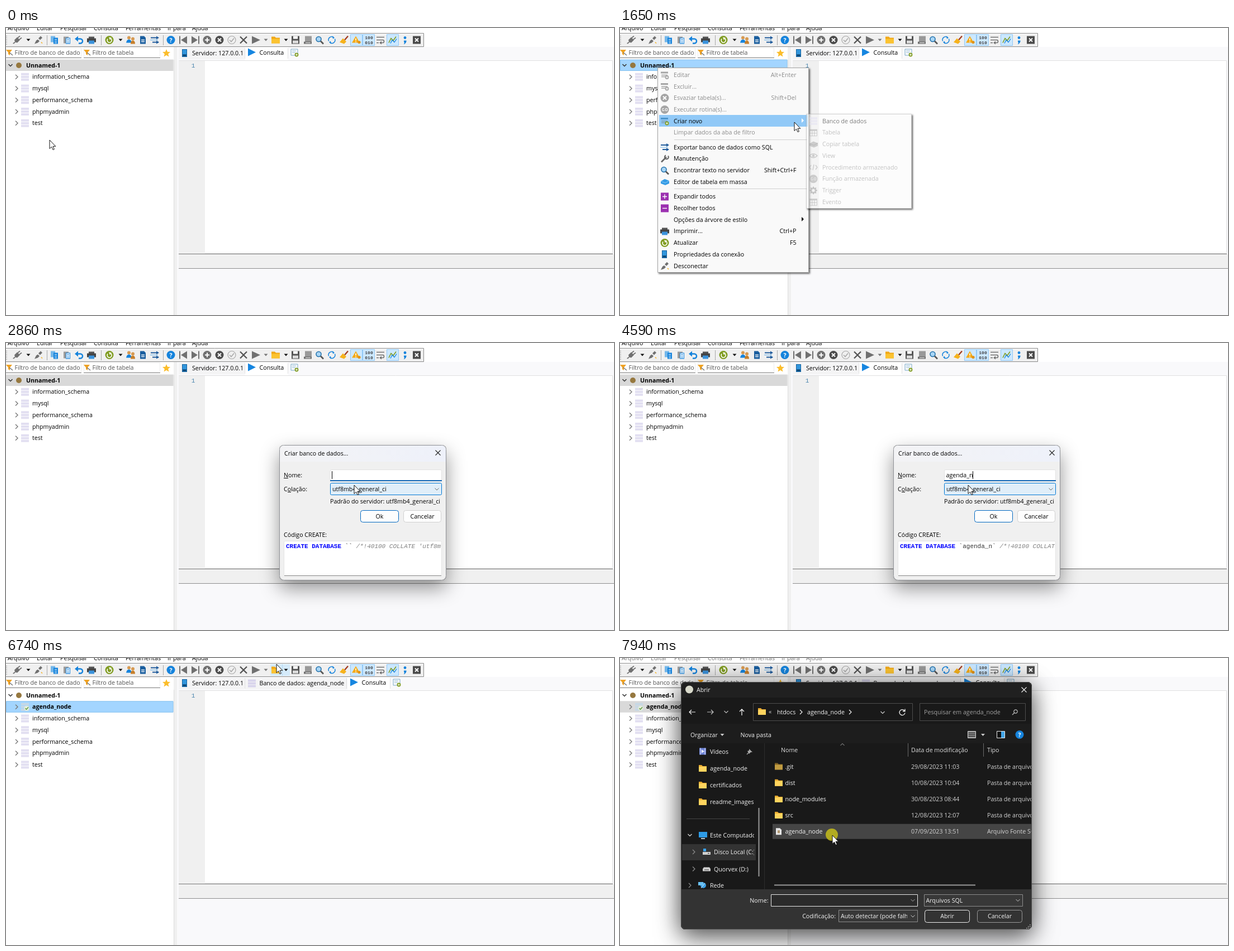
Recreate the animation shown at these times as an HTML page with a canvas. Size 1088x515 px, loop 8 s.

```html
<!DOCTYPE html>
<html lang="pt">
<head>
<meta charset="utf-8">
<title>Criar banco de dados</title>
<style>
html, body { margin: 0; width: 100%; height: 100%; overflow: hidden; background: #fff; }
canvas { display: block; width: 1088px; height: 515px; }
</style>
</head>
<body>
<canvas id="stage" width="1088" height="515"></canvas>
<script>
const g = document.getElementById('stage').getContext('2d');
const LOOP = 8000;
const SANS = '"Open Sans", "Noto Sans", sans-serif', MONO = '"Liberation Mono", monospace';
const GREY = '#707070', BLUE = '#1583dc', GOLD = '#f6b21b', GREEN = '#809c22', LAV = '#e2dff1';

// Basic drawing
function box(x, y, w, h, fill, line, r = 0) {
  g.beginPath();
  if (line) g.roundRect(x + .5, y + .5, w - 1, h - 1, r); else g.roundRect(x, y, w, h, r);
  if (fill) { g.fillStyle = fill; g.fill(); }
  if (line) { g.strokeStyle = line; g.lineWidth = 1; g.stroke(); }
}
function shape(x, y, d, color, width) {
  g.save();
  g.translate(x, y);
  const p = new Path2D(d);
  if (width) { g.strokeStyle = color; g.lineWidth = width; g.stroke(p); }
  else { g.fillStyle = color; g.fill(p); }
  g.restore();
}
function text(s, x, y, color = '#000', { bold, align = 'left', font } = {}) {
  g.font = font || `${bold ? 'bold ' : ''}10.65px ${SANS}`;
  g.textAlign = align;
  g.fillStyle = color;
  g.fillText(s, x, y + 4);
}
function clipped(x, y, w, h, draw) {
  g.save();
  g.beginPath();
  g.rect(x, y, w, h);
  g.clip();
  draw();
  g.restore();
}
// Only the part outside the box, so that faded boxes stay clean
function shadow(x, y, w, h, r, blur, shift, color) {
  g.save();
  g.beginPath();
  g.rect(-200, -200, 1500, 1000);
  g.roundRect(x, y, w, h, r);
  g.clip('evenodd');
  g.shadowColor = color;
  g.shadowBlur = blur;
  [g.shadowOffsetX, g.shadowOffsetY] = shift;
  box(x, y, w, h, '#000', null, r);
  g.restore();
}
function zoomed(cx, cy, s, alpha, draw) {
  g.save();
  g.globalAlpha = alpha;
  g.translate(cx, cy);
  g.scale(s, s);
  g.translate(-cx, -cy);
  draw();
  g.restore();
}
const ring = (r, x = 0, y = 0) => `M${x - r} ${y}a${r} ${r} 0 1 0 ${2 * r} 0a${r} ${r} 0 1 0 ${-2 * r} 0Z`;
const bar = (x, y, w, h) => `M${x} ${y}h${w}v${h}h${-w}Z`;
const CHEVRON = { down: 'M-3.5 -2L0 1.5L3.5 -2', up: 'M-3.5 2L0 -1.5L3.5 2', right: 'M-2 -4L2 0L-2 4' };
const chevron = (dir, x, y, color, w = 1.2) => shape(x, y, CHEVRON[dir], color, w);
const caretDown = (x, y, c = '#222') => shape(x, y, 'M-3.5 -2H3.5L0 2Z', c);

// Icon layers: path, colour, optional stroke width
const icons = {
  plug: [['M-8 6L-4 3L-5 0L0 -5L5 0L0 5L-3 4L-6 7Z', GREY], ['M1 -4L5 -7M4 -1L8 -4', GREY, 1.6]],
  unplug: [['M-7 7L-4 1L-1 -1L2 2L-1 5Z', GREY], ['M0 -3L4 -7L7 -4L3 0Z', GREY], ['M5 4L7 6', GOLD, 1.5]],
  copy: [[bar(-7, -7, 8, 11), '#74b7ea'], [bar(-2, -4, 8, 11), BLUE], ['M0 -1H4M0 2H4M0 5H4', '#fff', 1]],
  paste: [[bar(-6, -6, 9, 12), '#9b9b9b'], [bar(-2, -4, 8, 11), BLUE], [bar(-1, -3, 6, 9), '#fff'], ['M0 -1H4M0 2H4M0 5H4', BLUE, 1]],
  undo: [['M-5 -2H2a4 4 0 0 1 0 8H-1', BLUE, 2.5], ['M-8 -2L-2 -7V3Z', BLUE]],
  print: [[bar(-5, -6, 10, 4), '#555'], [bar(-8, -3, 16, 7), '#444'], [bar(-5, 1, 10, 6), '#3b93dc']],
  refresh: [[ring(7.5), GREEN], ['M-3 -2a4 4 0 1 0 5 -1', '#fff', 1.6], ['M-1 -5L4 -4L1 0Z', '#fff']],
  users: [[ring(3, -3, -4) + ring(3, 4, -2), '#d79a52'], ['M-8 5Q-7 -1 -3 -1Q1 -1 2 5Z', BLUE], ['M0 7Q0 1 4 1Q8 1 8 7Z', '#c77f2b']],
  doc: [['M-5 -7H2L5 -4V7H-5Z', '#1a5e9e'], ['M-3 0H3M-3 3H3', '#fff', 1.4]],
  flow: [['M-7 -4H4M-4 4H7', '#215c9c', 2], ['M3 -7L8 -4L3 -1ZM3 1L8 4L3 7Z', '#215c9c'], ['M-8 0H6', '#62aee8', 1]],
  help: [[ring(7.5), BLUE]],
  first: [[bar(-7, -7, 2, 14) + 'M7 -7V7L-4 0Z', GREY]],
  last: [[bar(5, -7, 2, 14) + 'M-7 -7V7L4 0Z', GREY]],
  plus: [[ring(7.5), GREY], ['M-4 0H4M0 -4V4', '#fff', 2]],
  stop: [[ring(7.5), '#4c4c4c'], ['M-3 -3L3 3M3 -3L-3 3', '#fff', 2]],
  check: [[ring(7), '#a9a9a9', 1.2], ['M-4 0L-1 3L4 -3', '#a9a9a9', 1.6]],
  cross: [['M-6 -6L6 6M6 -6L-6 6', '#505050', 2.2]],
  play: [['M-7 -7L8 0L-7 7Z', GREY]],
  run: [['M-7 -7L7 0L-7 7Z', '#1686e0']],
  folder: [['M-8 -6H-2L0 -4H7V6H-8Z', '#f0a818'], [bar(-8, -2, 15, 8), '#fbc331']],
  dir: [['M-7 -6H-2L0 -4H7V6H-7Z', '#e9ab30'], [bar(-7, -3, 14, 9), '#ffd45e']],
  save: [[bar(-7, -7, 14, 14), '#555'], [bar(-4, -7, 8, 5), '#fff'], [bar(-5, 1, 10, 5), '#ddd']],
  saveAs: [[bar(-5, -7, 12, 11), '#999'], [bar(-7, 3, 14, 4), GREY], ['M-4 5H5', '#eee', 1]],
  find: [[ring(4.5, -1.5, -1.5), '#a8d5f5'], [ring(4.5, -1.5, -1.5), '#2472ac', 1.6], ['M2 2L7 7', '#555', 2.6]],
  replace: [['M-5.5 2A5.8 5.8 0 0 1 3 -5M5.5 -2A5.8 5.8 0 0 1 -3 5', BLUE, 1.5], ['M1 -7L5 -4L2 -2ZM-1 7L-5 4L-2 2ZM4 4L7 7', BLUE]],
  broom: [['M7 -7L1 0', '#a33d24', 2.4], ['M-2 -3L4 3L0 7L-8 4Z', GOLD]],
  warn: [['M-1 -7L6 5H-8Z', '#f5aa17'], ['M-1 -3V1M-1 2.5V4', '#fff', 1.6], [ring(2.6, 5, 4), '#e19319']],
  wrap: [['M-7 -5H7M-7 0H5a2.8 2.8 0 0 1 0 5H0M-7 5H-3', GREY, 1.6], ['M-2 5L2 2V8Z', GREY]],
  wand: [['M-7 5L-3 -3L1 1L6 -6', GREEN, 1.6], ['M-4 6L-1 0L3 4L7 -2', BLUE, 1.3]],
  semi: [[ring(2.4, 0, -4), BLUE], ['M-2 1H2.5Q3 5 -2 8L-1 4H-2Z', BLUE]],
  close: [[bar(-7, -7, 14, 14), '#4b4b4b'], ['M-3 -3L3 3M3 -3L-3 3', '#fff', 1.8]],
  db: [[bar(-7, -7, 14, 4) + bar(-7, -2, 14, 4) + bar(-7, 3, 14, 4), LAV]],
  server: [[bar(-5, -7, 9, 14), '#16639f'], [bar(-4, -6, 7, 8), '#3296dc'], ['M-3 4H2', '#0b3556', 1.4]],
  filter: [['M-6 -5H5L1 0V5L-2 3V0Z', '#efa223'], ['M0 0L6 5', '#777', 1.5]],
  star: [['M0 -7L2 -2.3L7 -2L3.2 1.4L4.4 6.5L0 3.7L-4.4 6.5L-3.2 1.4L-7 -2L-2 -2.3Z', '#fbbd2b']],
  newTab: [['M-6 -6H6V5H-6Z', '#7babc9', 1], ['M-4 -3H3M-4 0H2', '#8fbcd8', 1], [ring(3.4, 4, 4), GREEN], ['M2 4H6M4 2V6', '#fff', 1]],
  sheet: [[bar(-7, -6, 13, 3), '#4d95cc'], ['M-6 0H5M-6 3H1', '#7f9aab', 1.4], [ring(3.4, 4, 4), GREEN], ['M2 4H6M4 2V6', '#fff', 1]],
  go: [[ring(7.5), '#777'], ['M-1 -2H-4V2H-1V0M1.5 -2H4.5V2H1.5Z', '#fff', 1]],
  wrench: [['M-6 6L3 -3', '#666', 2.6], ['M6 -5A3.5 3.5 0 1 1 2 -6', '#666', 2]],
  cube: [['M-7 -1L0 -5L8 -2V3L1 6L-7 3Z', '#349be5'], ['M-7 -1L1 2L8 -2', '#89c9f4', 1]],
  expand: [[bar(-7, -7, 14, 14), '#9b30b0'], ['M-4 0H4M0 -4V4', '#fff', 1.4]],
  collapse: [[bar(-7, -7, 14, 14), '#9b30b0'], ['M-4 0H4', '#fff', 1.4]],
  table: [[bar(-7, -6, 14, 3), '#888'], ['M-6.5 -3V6H6.5V-3M-6 1H6M-2 -3V6M2 -3V6', '#999', 1]],
  eye: [['M-7 0Q0 -7 7 0Q0 7 -7 0Z', '#999', 1.4], [ring(2.3), '#888']],
  code: [['M-4 -4L-7 0L-4 4M4 -4L7 0L4 4M1 -5L-1 5', '#888', 1.4]],
  gear: [[ring(4), '#777', 3], ['M0 -7V-4M0 4V7M-7 0H-4M4 0H7M-5 -5L-3 -3M5 5L3 3M5 -5L3 -3M-5 5L-3 3', '#777', 2]],
  film: [[bar(-6, -6, 12, 12), '#6f86d8'], ['M-4 -6V6M4 -6V6', '#e5e0ff', 1], ['M-2 -3L3 0L-2 3Z', '#fff']],
  pin: [['M-1 -5L5 1L2 1L-1 4L-4 -1L-1 -2ZM-2 2L-5 5', '#aaa'], ['M-2 2L-5 5', '#aaa', 1.2]],
  screen: [[bar(-7, -6, 15, 10), '#2e9be6'], [bar(-3, 5, 7, 2), '#b9c9d4']],
  disk: [[bar(-7, 0, 14, 5), '#d0d0d0'], [bar(-6, -6, 5, 5), '#39a2ec'], ['M2 2.5H5', '#333', 1]],
  drive: [['M-5 -3H5L7 0V4H-7V0Z', '#d0d0d0'], ['M-4 1.5H4', '#444', 1]],
  net: [[ring(5, 1, 0), '#3b9fe4'], [bar(-8, -6, 9, 6), '#69c0f2'], ['M-3 5L4 -4', '#d9f1ff', 1]],
  file: [['M-5 -6H2L5 -3V6H-5Z', '#e8e8e8'], [bar(-2, -2, 4, 5), '#b39a74']],
};
function icon(name, x, y, tint) {
  for (const [d, c, w] of icons[name]) shape(x, y, d, tint && c !== '#fff' ? tint : c, w);
}
const helpMark = (x, y) => {
  icon('help', x, y);
  text('?', x, y + .5, '#fff', { bold: true, align: 'center' });
};

// Timing
const clamp = v => Math.max(0, Math.min(1, v));
const span = (t, a, b) => clamp((t - a) / (b - a));
const within = (t, a, b) => t >= a && t < b;
const easeOut = u => 1 - (1 - u) ** 3;
const route = [
  [130, 78, 201], [590, 67, 71], [880, 67, 71], [1230, 150, 160], [1520, 289, 167], [1650, 312, 169],
  [1930, 400, 168], [2180, 376, 173], [2420, 376, 173], [2860, 623, 255], [5230, 623, 255], [5670, 376, 193],
  [5740, 376, 193], [5860, 240, 112], [6050, 166, 86], [6320, 166, 86], [6680, 484, 11], [6860, 484, 11],
  [7320, 505, 143], [7500, 505, 143], [7850, 380, 318],
];
function pointer(t) {
  const i = route.findIndex(k => k[0] > t);
  if (i === 0) return route[0].slice(1);
  if (i < 0) return route[route.length - 1].slice(1);
  const [t0, x0, y0] = route[i - 1], [t1, x1, y1] = route[i];
  let u = (t - t0) / (t1 - t0);
  u = u * u * (3 - 2 * u);
  return [x0 + (x1 - x0) * u, y0 + (y1 - y0) * u];
}
const NAME = 'agenda_node';
const keys = [3120, 3320, 3420, 3520, 3650, 3790, 4320, 4590, 4680, 4770, 4850];
const typed = t => NAME.slice(0, keys.filter(k => t >= k).length);

// Main window
const tools = { plug: 20, unplug: 58, copy: 87, paste: 109, undo: 131, print: 153, refresh: 185, users: 223, doc: 245,
  flow: 266, first: 317, last: 339, plus: 360, stop: 382, check: 404, cross: 425, play: 447, folder: 483, save: 518,
  saveAs: 540, find: 561, replace: 583, broom: 605, warn: 627, wrap: 670, wand: 692, semi: 714, close: 735 };
const menuBar = { Arquivo: 3, Editar: 55, Pesquisar: 97, Consulta: 157, Ferramentas: 214, 'Ir para': 289, Ajuda: 333 };

function toolbar(t) {
  for (const s in menuBar) text(s, menuBar[s], 0, t > 7200 ? '#777' : '#000');
  box(-1, 9, 749, 25, '#f0f0f0', '#8a8a8a');
  box(0, 10, 747, 1, '#fff');
  for (let y = 14; y < 30; y += 3) box(0, y, 2, 1, '#aaa');
  for (const x of [73, 170, 281]) box(x, 13, 1, 18, '#a8a8a8');
  for (const x of [627, 649, 692]) box(x - 11, 11, 22, 21, '#cce8ff', '#90c8f6');
  if (within(t, 6640, 7000)) {
    box(473, 11, 35, 21, '#d5ebfb');
    box(494, 11, 1, 21, '#b5d9f3');
  }
  for (const n in tools) icon(n, tools[n], 21.5);
  helpMark(295, 21.5);
  for (const x of [40, 205, 465, 501]) caretDown(x, 21.5, x === 465 ? '#777' : '#111');
  const tiny = { bold: true, align: 'center', font: `bold 8px ${MONO}` };
  text('100', 649.5, 16, '#444', tiny);
  text('010', 649.5, 25, '#444', tiny);
}

function tree(t) {
  box(0, 34, 300, 481, '#fff');
  for (const [x, w, s] of [[0, 135, 'Filtro de banco de dado'], [139, 137, 'Filtro de tabela']]) {
    box(x, 35, w, 18, '#fff', '#ececec');
    box(x, 53, w, 1, '#868686');
    icon('filter', x + 6, 44);
    text(s, x + 15.5, 44, '#555');
  }
  icon('star', 287, 45);
  const made = t >= 5240, opened = t >= 6120;
  const focused = within(t, 600, 2320) || within(t, 5240, 7180);
  const rowY = i => 66.5 + 20.75 * i;
  box(0, rowY(opened ? 1 : 0) - 10, 299.5, 20.5, focused ? '#a3d5ff' : '#d9d9d9', focused ? '#84c1ef' : null);
  chevron('down', 8, 67, '#333', 1.5);
  shape(23, 67, ring(5), '#96783f');
  text('Unnamed-1', 36, 66.5, '#000', { bold: true });
  const names = ['information_schema', 'mysql', 'performance_schema', 'phpmyadmin', 'test'];
  if (made) names.unshift(NAME);
  names.forEach((s, i) => {
    const y = rowY(i + 1), active = opened && i === 0;
    chevron('right', 19, y + .5, '#777', 1.4);
    icon('db', 34, y + .5, active && '#c6d8e5');
    if (active) {
      shape(37, y + 3, ring(4.5), '#e4eedb');
      shape(37, y + 3, 'M-2.5 0L-.5 2L3 -2', '#5b963a', 1.4);
    }
    text(s, 47, y, '#000', { bold: active });
  });
}

function editor(t) {
  box(300, 34, 788, 481, '#f9f9fb');
  box(300, 34, 6, 481, '#f0f0f0');
  box(300, 57, 1, 458, '#ddd');
  const shift = t >= 6200 ? 183 : 0;
  box(309, 36, 117, 20, '#f4f4f5');
  icon('server', 320, 45);
  text('Servidor: 127.0.0.1', 333, 45);
  box(427, 36, 1, 19, '#dedede');
  if (shift) {
    box(428, 36, 181, 20, '#f4f4f5');
    icon('db', 440, 45.5, '#d8d4ec');
    text('Banco de dados: ' + NAME, 453.5, 45);
    box(609, 36, 1, 19, '#dedede');
  }
  box(428 + shift, 34, 77, 24, '#fff');
  icon('run', 440 + shift, 43.5);
  text('Consulta', 453.5 + shift, 44);
  box(504 + shift, 36, 1, 19, '#e2e2e2');
  icon('newTab', 516 + shift, 44);
  box(309, 58, 777, 347, '#fff', '#e0e0e0');
  box(309, 59, 47, 346, '#f0f0f0');
  text('1', 335, 67, '#4884ad', { align: 'center', font: `11px ${MONO}` });
  box(309, 405, 777, 1, '#767676');
  box(309, 406, 779, 25, '#f0f0f0');
  box(309, 431, 779, 1, '#8d8d8d');
}

// Context menus: centre y, label, icon, enabled, shortcut
const contextItems = [
  [84, 'Editar', 'sheet', 0, 'Alt+Enter'], [104.5, 'Excluir...', 'sheet', 0], [125, 'Esvaziar tabela(s)...', 'stop', 0, 'Shift+Del'],
  [146, 'Executar rotina(s)...', 'go', 0], [166.5, 'Criar novo', 'sheet', 1], [187, 'Limpar dados da aba de filtro', '', 0],
  [213.5, 'Exportar banco de dados como SQL', 'flow', 1], [234, 'Manutenção', 'wrench', 1],
  [255, 'Encontrar texto no servidor', 'find', 1, 'Shift+Ctrl+F'], [275.5, 'Editor de tabela em massa', 'cube', 1],
  [302, 'Expandir todos', 'expand', 1], [323, 'Recolher todos', 'collapse', 1], [343.5, 'Opções da árvore de estilo', '', 1],
  [364, 'Imprimir...', 'print', 1, 'Ctrl+P'], [385, 'Atualizar', 'refresh', 1, 'F5'],
  [405.5, 'Propriedades da conexão', 'server', 1], [426.5, 'Desconectar', 'unplug', 1],
];
const createItems = [['Banco de dados', 'db'], ['Tabela', 'table'], ['Copiar tabela', 'cube'], ['View', 'eye'],
  ['Procedimento armazenado', 'code'], ['Função armazenada', 'go'], ['Trigger', 'gear'], ['Evento', 'table']]
  .map(([s, n], i) => [166.5 + 20.75 * i, s, n, i === 0]);

function menu(x, y, w, h, items, alpha, isHot) {
  g.save();
  g.globalAlpha = clamp(alpha * 2);
  shadow(x, y, w, h, 0, 3, [2, 2], 'rgba(0,0,0,.6)');
  g.globalAlpha = alpha;
  box(x, y, w, h, '#f9f9f9', '#a5a5a5');
  for (const [cy, label, name, on, keys] of items) {
    if (isHot(cy)) box(x + 3, cy - 10.5, w - 5, 21, on ? '#91c9f7' : '#e8e8e8');
    if (name) icon(name, x + 13, cy + .5, !on && '#a5a5a5');
    const c = on ? '#000' : '#8d8d8d';
    text(label, x + 29, cy, c);
    if (keys) text(keys, x + 248.5, cy, c, { align: 'right' });
  }
  g.restore();
}
function menus(t, [px, py]) {
  if (!within(t, 730, 2330)) return;
  const inSub = px > 334 && t > 1700, fade = span(t, 680, 860);
  menu(67, 71, 271, 368, contextItems, fade, cy => inSub ? cy === 166.5 : py > 73 && Math.abs(py - cy) <= 10.4);
  g.globalAlpha = fade;
  for (const y of [200, 288]) box(97, y, 238, 1, '#cfcfcf');
  shape(327, 166, 'M-2 -4L2 0L-2 4Z', t > 1560 ? '#fff' : '#111');
  shape(327, 343, 'M-2 -4L2 0L-2 4Z', '#111');
  g.globalAlpha = 1;
  if (t > 1580) menu(333, 154, 189, 170, createItems, span(t, 1580, 1720), cy => inSub && Math.abs(py - cy) <= 10.4);
}

function createDialog(t, [px, py]) {
  shadow(489, 183, 299, 243, 8, 34, [0, 14], 'rgba(0,0,0,.42)');
  box(489, 183, 299, 243, '#f0f0f0', '#8f9196', 8);
  const tint = g.createLinearGradient(490, 0, 787, 0);
  tint.addColorStop(0, '#f3f3f5');
  tint.addColorStop(1, '#eef1fa');
  g.beginPath();
  g.roundRect(490, 184, 297, 29, [7, 7, 0, 0]);
  g.fillStyle = tint;
  g.fill();
  text('Criar banco de dados...', 498, 197.5);
  shape(773, 197, 'M-4.5 -4.5L4.5 4.5M4.5 -4.5L-4.5 4.5', '#222', 1.1);
  text('Nome:', 497, 237);
  box(497, 242, 8, 1, '#000');
  text('Colação:', 497, 262);
  box(504, 267, 6, 1, '#000');
  box(580, 227, 200, 21, '#fff', '#e1e1e1', 2);
  box(580, 246, 200, 2, '#1467b5');
  const name = typed(t);
  text(name, 583.5, 237);
  box(583 + g.measureText(name).width, 230, 1, 14, '#000');
  const hot = px > 580 && px < 780 && py > 250 && py < 274;
  box(580, 251, 200, 22, hot ? '#e0eef9' : '#fdfdfd', hot ? '#0078d4' : '#d0d0d0', 2);
  text('utf8mb4_general_ci', 584, 262);
  chevron('down', 771, 262.5, '#666', 1);
  text('Padrão do servidor: utf8mb4_general_ci', 580, 284);
  box(634, 300, 69, 22, '#fdfdfd', '#0067c0', 4);
  text('Ok', 668.5, 311, '#000', { align: 'center' });
  box(711, 300, 68, 22, '#fdfdfd', '#d0d0d0', 4);
  text('Cancelar', 745, 311, '#000', { align: 'center' });
  text('Código CREATE:', 497, 344);
  box(497, 355, 283, 63, '#fff', '#e3e3e3', 2);
  box(498, 417, 281, 1, '#868686');
  clipped(498, 355, 280, 60, () => {
    const w = 6.6;
    text('CREATE DATABASE', 501, 363.5, '#00f', { font: `bold 11px ${MONO}` });
    text('`' + name + '`', 501 + 16 * w, 363.5, '#333', { font: `11px ${MONO}` });
    text("/*!40100 COLLATE 'utf8mb4_general_ci' */", 501 + (19 + name.length) * w, 363.5, '#808080', { font: `italic 11px ${MONO}` });
  });
}

// File picker
const files = [['.git', 'dir', '29/08/2023 11:03'], ['dist', 'dir', '10/08/2023 10:04'],
  ['node_modules', 'dir', '30/08/2023 08:44'], ['src', 'dir', '12/08/2023 12:07'], [NAME, 'file', '07/09/2023 13:51']];
const places = [[167.5, 'Vídeos', 'film'], [198, NAME, 'dir'], [228, 'certificados', 'dir'], [258, 'readme_images', 'dir'],
  [318, 'Este Computador', 'screen', 'down'], [348, 'Disco Local (C:)', 'disk', 'right', 7],
  [378.5, 'Quorvex (D:)', 'drive', 'right', 7], [408, 'Rede', 'net', 'right']];

function openDialog(t, [px, py]) {
  const ink = '#f2f2f2', dim = '#a0a0a0', mid = { align: 'center' };
  shadow(109, 43, 628, 444, 8, 40, [0, 2], 'rgba(0,0,0,.35)');
  shadow(109, 43, 628, 444, 8, 44, [0, 16], 'rgba(0,0,0,.5)');
  g.save();
  g.beginPath();
  g.roundRect(109, 43, 628, 444, 8);
  g.clip();
  box(109, 43, 628, 444, '#191919');
  box(109, 43, 628, 28, '#202020');
  box(109, 118, 628, 35, '#1d1d1d');
  shape(124, 56.5, ring(7), '#d9dacb');
  text('Abrir', 137, 57, ink);
  shape(723, 57, 'M-4.5 -4.5L4.5 4.5M4.5 -4.5L-4.5 4.5', ink, 1.1);
  shape(129, 97, 'M6 0H-5M-1 -4L-5 0L-1 4', ink, 1.2);
  shape(162, 97, 'M-6 0H5M1 -4L5 0L1 4', '#c2c2c2', 1.2);
  chevron('down', 190, 97, '#bbb');
  shape(218, 97, 'M0 6V-5M-4 -1L0 -5L4 -1', ink, 1.3);
  box(238, 81, 286, 32, '#191919', '#4d4d4d');
  icon('dir', 254, 96);
  text('«', 266, 95.5, '#ccc');
  text('htdocs', 281, 97, ink);
  chevron('right', 324, 97, ink);
  text(NAME, 335, 97, ink);
  if (t > 7420) chevron('right', 412, 97, ink);
  chevron('down', 470, 98, '#ccc');
  shape(505, 97.5, 'M4 -3A5 5 0 1 0 5 1M5 -6V-2H1', ink, 1.3);
  box(536, 81, 190, 32, '#191919', '#4d4d4d');
  text('Pesquisar em ' + NAME, 544, 97, dim);
  shape(707, 97, ring(3.2, 1, -1) + 'M-1.5 1.5L-5 5', '#bbb', 1.2);
  text('Organizar', 126, 137.5, ink);
  caretDown(183, 138, '#ccc');
  text('Nova pasta', 215.5, 137.5, ink);
  box(622, 131, 15, 13, '#888', '#ccc');
  shape(629.5, 137.5, 'M-6 -3H6M-6 0H6M-6 3H6', '#222', 1);
  caretDown(649.5, 138, '#ccc');
  box(674, 131, 15, 13, '#111', '#eee');
  box(682, 132, 6, 11, '#42a5e8');
  helpMark(715, 137.5);

  clipped(109, 153, 134, 262, () => {
    box(111, 334, 132, 29, '#333');
    for (const [y, s, name, dir, indent = 0] of places) {
      icon(name, 148 + indent, y);
      if (dir) chevron(dir, 125 + indent, y, dir === 'down' ? '#ddd' : '#8c8c8c');
      clipped(109, y - 12, 131, 24, () => text(s, 161 + indent, y, ink));
    }
    icon('pin', 232, 168);
    box(119, 288, 113, 1, '#444');
  });
  box(247.5, 269, 2, 123, '#999');
  box(258, 153, 1, 262, '#2d2d2d');

  text('Nome', 288, 164.5, '#ddd');
  chevron('up', 398, 155, '#aaa', 1);
  text('Data de modificação', 521, 164.5, '#ddd');
  text('Tipo', 657, 164.5, '#ddd');
  for (const x of [515, 650]) box(x, 153, 1, 24, '#6b6b6b');
  files.forEach(([s, name, date], i) => {
    const y = 194.5 + 29.2 * i;
    if (t > 7550 && px > 273 && Math.abs(py - y) < 13.5) box(273, y - 13.5, 464, 27, '#454545');
    g.save();
    if (i === 0) g.globalAlpha *= .5;
    icon(name, 284, y);
    g.restore();
    text(s, 295.5, y, ink);
    text(date, 521, y, '#d2d2d2');
    text(name === 'file' ? 'Arquivo Fonte SQL' : 'Pasta de arquivos', 657, y, '#d2d2d2');
  });
  box(276, 406.5, 360, 2, '#999');

  box(109, 415, 628, 72, '#333');
  const right = { align: 'right' };
  text('Nome:', 265.5, 434.5, ink, right);
  box(270, 424, 263, 22, '#2b2b2b', '#e8e8e8');
  if (t < 7800) box(274, 428, 1, 14, ink);
  chevron('down', 524, 435, '#aaa', 1);
  box(544, 424, 177, 22, '#383838', '#8c8c8c');
  text('Arquivos SQL', 547.5, 434.5, ink);
  chevron('down', 712, 435, '#ccc', 1);
  text('Codificação:', 386, 463, ink, right);
  box(391, 452, 142, 22, '#383838', '#8c8c8c');
  clipped(392, 453, 122, 20, () => text('Auto detectar (pode falhar)', 395, 463, ink));
  chevron('down', 524, 463.5, '#ccc', 1);
  box(545, 452, 81, 23, '#333', '#eee', 4);
  text('Abrir', 585.5, 463, ink, mid);
  box(639, 452, 81, 23, '#333', '#999', 4);
  text('Cancelar', 679.5, 463, ink, mid);
  for (let i = 0; i < 3; i++) for (let j = 0; j <= i; j++) box(733 - 3 * j, 478 + 3 * i, 1.5, 1.5, '#bbb');
  g.restore();
  box(109, 43, 628, 444, null, '#4a4a4a', 8);
}

function cursor(t, [x, y]) {
  if (within(t, 5400, 5900) && x > 356) {
    shape(x, y, 'M-3 -7.5H-1L0 -6.5L1 -7.5H3M0 -6.5V6.5M-3 7.5H-1L0 6.5L1 7.5H3', '#222', 1.2);
    return;
  }
  if (t > 7870) shape(x - 1, y - 1, ring(11), 'rgba(205,196,24,.8)');
  const arrow = 'M0 0V15.5L3.6 12.2L6.1 17.6L8.4 16.6L6 11.3H10.8Z';
  shape(x, y, arrow, '#fff');
  shape(x, y, arrow, '#111', 1);
}

function draw(t) {
  const p = pointer(t);
  g.globalAlpha = 1;
  box(0, 0, 1088, 515, '#fff');
  editor(t);
  tree(t);
  toolbar(t);
  menus(t, p);
  if (within(t, 2320, 5280)) {
    const k = easeOut(span(t, 2320, 2600)), out = span(t, 5120, 5280);
    zoomed(638.5, 304.5, .9 + .1 * k - .08 * out, Math.min(1, k * 1.3) * (1 - out), () => createDialog(t, p));
  }
  if (t >= 7200) {
    const u = span(t, 7200, 7550);
    zoomed(373.5, 248.5, .86 + .14 * easeOut(u), clamp(u * 3), () => openDialog(t, p));
  }
  cursor(t, p);
}

function frame() {
  draw(performance.now() % LOOP);
  requestAnimationFrame(frame);
}
frame();
</script>
</body>
</html>
```
